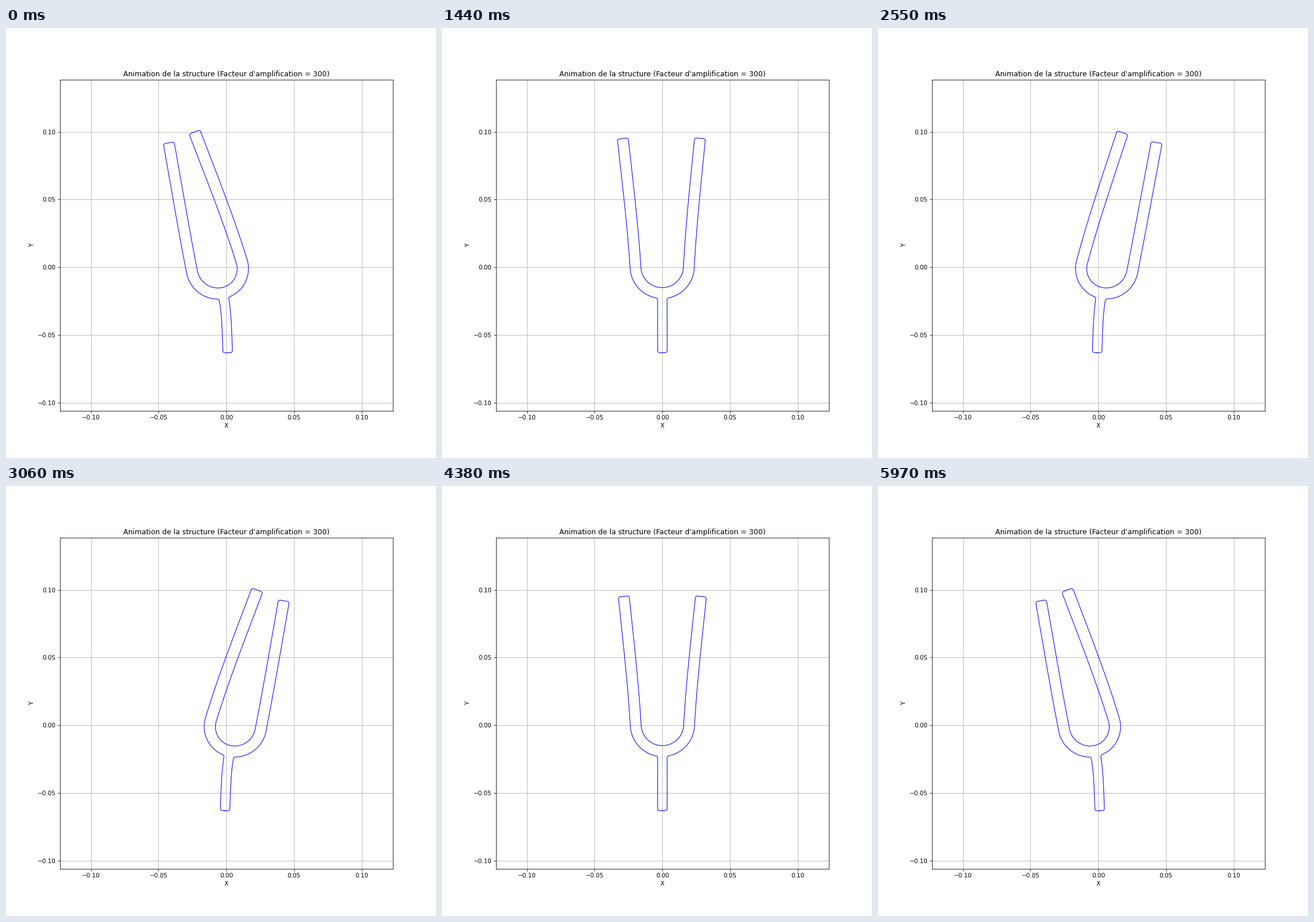
Recreate the animation shown at these times as a matplotlib script. Size 748 by 748 pixels, loop 6000 ms.

```python
import numpy as np
import matplotlib.pyplot as plt
from matplotlib.animation import FuncAnimation

FRAMES, STEP = 200, 30            # loop of 6000 ms
SWAY_MS, PINCH_MS = 5840, 2940    # periods of the two modes

# Tuning fork dimensions (m)
R_IN, R_MID, R_OUT = 0.015, 0.019, 0.023
TOP, BOTTOM = 0.0955, -0.063
STEM = 0.0035
FILLET = 0.0015

LAM, SIG = 1.8751, 0.7341         # first cantilever mode


def arc(cx, cy, r, a0, a1, n=12):
    a = np.linspace(a0, a1, n)
    return np.column_stack([cx + r * np.cos(a), cy + r * np.sin(a)])


def line(x, y0, y1, n=40):
    return np.column_stack([np.full(n, x), np.linspace(y0, y1, n)])


def fork_outline():
    f, q = FILLET, np.pi / 2
    cx = STEM + f
    cy = -np.sqrt((R_OUT + f) ** 2 - cx ** 2)
    b = np.arctan2(cx, -cy)
    half = np.vstack([
        [[0, BOTTOM]],
        arc(STEM - f, BOTTOM + f, f, -q, 0),
        line(STEM, BOTTOM + f, cy),
        arc(cx, cy, f, 2 * q, q + b),
        arc(0, 0, R_OUT, b - q, 0, 50),
        line(R_OUT, 0, TOP - f),
        arc(R_OUT - f, TOP - f, f, 0, q),
        arc(R_IN + f, TOP - f, f, q, 2 * q),
        line(R_IN, TOP - f, 0),
        arc(0, 0, R_IN, 0, -q, 50),
    ])
    return np.vstack([half, half[::-1] * [-1, 1]])


def half_field(x, y, u0, rot, bend, flex):
    """Displacement of the right half: curved base, then a bending prong."""
    b = np.where(y < 0, np.arctan2(x, -y), np.pi / 2)
    s, c = np.sin(b), np.cos(b)
    u = u0 + R_MID * (rot * (1 - c) + bend * (s - b * c))
    v = -R_MID * (rot * s + bend * (b * s + c - 1))
    tilt = rot + bend * b

    h = np.maximum(y, 0)
    z = LAM * h / TOP
    u = u + tilt * h + flex / 2 * (
        np.cosh(z) - np.cos(z) - SIG * (np.sinh(z) - np.sin(z)))
    tilt = tilt + flex * LAM / (2 * TOP) * (
        np.sinh(z) + np.sin(z) - SIG * (np.cosh(z) - np.cos(z)))

    dx = x - R_MID * s
    dy = np.where(y < 0, y + R_MID * c, 0)
    return u + tilt * dy, v - tilt * dx


def sway_mode(x, y):
    u, v = half_field(abs(x), y, 0.00267, 0.187, 0.041, 0.002)
    v = v * np.sign(x)
    length = -R_OUT - BOTTOM
    e = (y - BOTTOM) / length
    stem = y < -0.024
    u = np.where(stem, -0.001 + length * (0.034 * e + 0.153 * e ** 4 / 4), u)
    v = np.where(stem, -(0.034 + 0.153 * e ** 3) * x, v)
    return np.column_stack([u, v])


def pinch_mode(x, y):
    u, v = half_field(abs(x), y, 0, 0, 0.0356, 0.0035)
    stem = y < -0.024
    return np.column_stack([np.where(stem, 0, u * np.sign(x)),
                            np.where(stem, 0, v)])


rest = fork_outline()
sway = sway_mode(*rest.T)
pinch = pinch_mode(*rest.T)

fig, ax = plt.subplots(figsize=(10, 10), dpi=74.8)
ax.set_xlim(-0.12295, 0.12295)
ax.set_ylim(0.01636 - 0.12215, 0.01636 + 0.12215)
ax.set_title("Animation de la structure (Facteur d'amplification = 300)")
ax.set_xlabel("X")
ax.set_ylabel("Y")
ax.grid(True)
outline, = ax.plot([], [], color="blue", lw=1)


def update(i):
    w = 2 * np.pi * i * STEP
    shape = rest - np.cos(w / SWAY_MS) * sway - np.cos(w / PINCH_MS) * pinch
    outline.set_data(*shape.T)
    return outline,


anim = FuncAnimation(fig, update, frames=FRAMES, interval=STEP,
                     repeat=True, repeat_delay=0)
plt.show()
```
